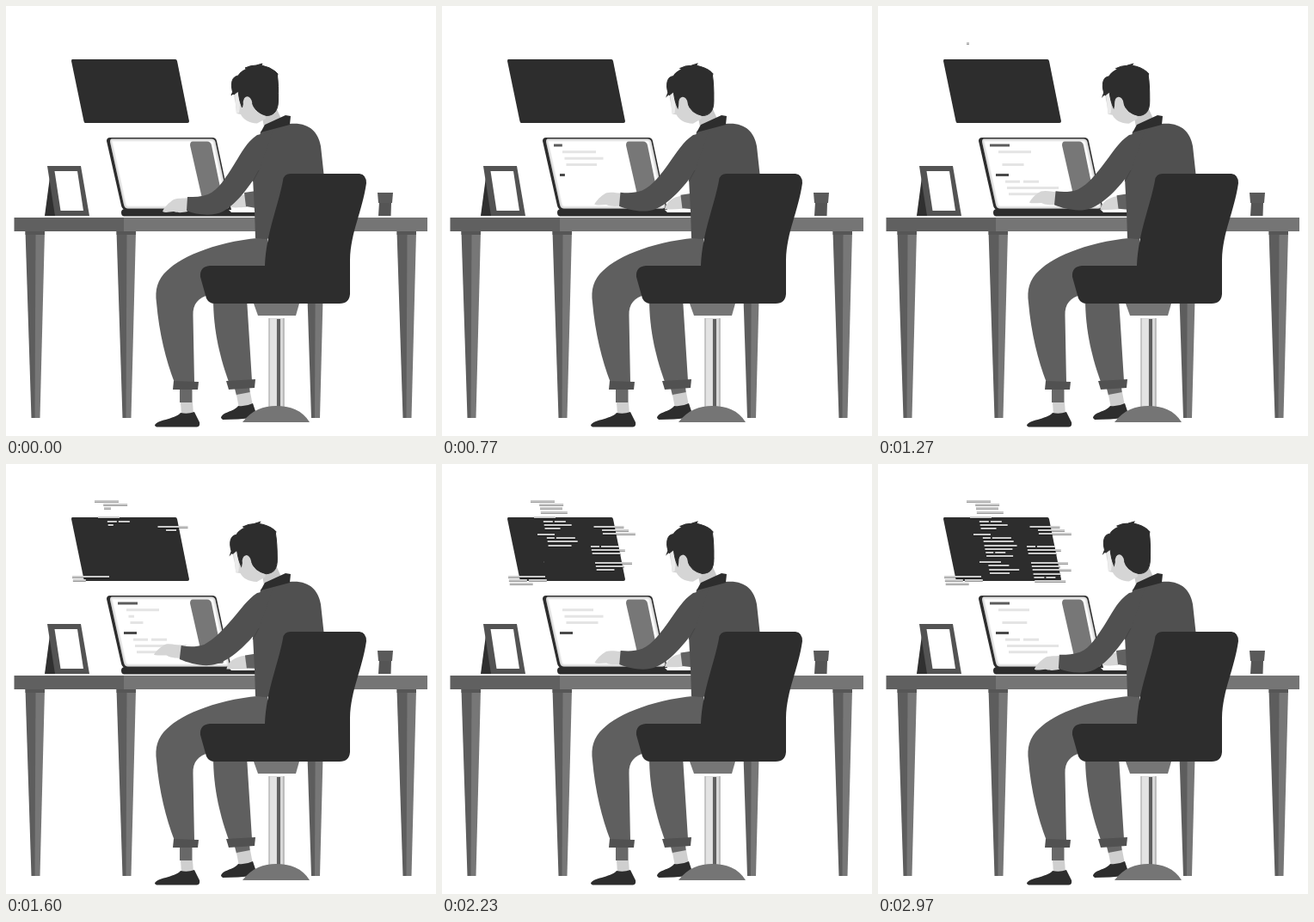
An HTML page with a canvas that plays this animation: 500 px wide and 500 px high, repeating every 3.01 s.

```html
<!DOCTYPE html>
<html lang="en">
<head>
<meta charset="utf-8">
<title>Typing at a desk</title>
<style>
html, body { margin: 0; width: 100%; height: 100%; overflow: hidden; background: #fff; }
canvas { display: block; width: 500px; height: 500px; }
</style>
</head>
<body>
<canvas id="stage" width="500" height="500"></canvas>
<script>
const LOOP = 3010;
const ctx = document.getElementById('stage').getContext('2d');
const DARK = '#2d2d2d', SHIRT = '#505050', PANTS = '#5f5f5f', SKIN = '#d5d5d5';

const fill = (color, d) => { ctx.fillStyle = color; ctx.fill(new Path2D(d)); };
const stroke = (color, width, d) => {
  ctx.strokeStyle = color;
  ctx.lineWidth = width;
  ctx.stroke(new Path2D(d));
};
const bar = (color, x, y, w, h) => { ctx.fillStyle = color; ctx.fillRect(x, y, w, h); };
const clamp = v => Math.max(0, Math.min(1, v));

// Mixes two paths that share the same commands.
function mix(a, b, p) {
  const to = b.match(/[\d.]+/g);
  let i = 0;
  return a.replace(/[\d.]+/g, n => (+n + (to[i++] - n) * p).toFixed(2));
}

// Value at time t in a flat list of time, value pairs.
function track(keys, t) {
  for (let i = 2; i < keys.length; i += 2) {
    if (t < keys[i]) {
      const k = (t - keys[i - 2]) / (keys[i] - keys[i - 2]);
      return keys[i - 1] + (keys[i + 1] - keys[i - 1]) * k;
    }
  }
  return keys[keys.length - 1];
}

// A line drawn up to `len`, with an optional break.
function codeLine(color, x, y, len, h, gap, space) {
  if (len <= 0) return;
  bar(color, x, y, gap ? Math.min(len, gap) : len, h);
  if (gap && len > gap + space) bar(color, x + gap + space, y, len - gap - space, h);
}

const boardGroups = [
  { at: 1255, step: 150, x: 103, y: 42, indent: 9.3, w: [28, 28, 26, 31], gaps: {} },
  { at: 1290, step: 142, x: 107, y: 61.3, indent: 10, w: [25, 26, 32, 18], gaps: { 1: 11 } },
  { at: 1860, step: 100, x: 111, y: 81, indent: 10, w: [20, 33, 35, 38, 32, 23, 31], gaps: { 1: 9, 5: 9 } },
  { at: 2230, step: 150, x: 118, y: 113.2, indent: 9.5, w: [25, 24, 35, 23], gaps: {} },
  { at: 1400, step: 145, x: 176.5, y: 71.8, indent: 8.7, w: [35, 31, 38], gaps: {} },
  { at: 1700, step: 148, x: 173, y: 94.9, indent: 0, w: [33, 39, 33], gaps: { 0: 10 } },
  { at: 1980, step: 102, x: 178, y: 114, indent: 0, w: [43, 33, 45, 32, 25, 36], gaps: { 4: 12 } },
  { at: 1400, step: 150, x: 77, y: 130, indent: 0, w: [43, 44, 27], gaps: { 1: 21 } }
];

const HEADING = '#5c5c5c', TEXT = '#e4e4e4';
const screenLines = [
  { c: HEADING, x: 130, y: 160.5, k: [0, 0, 130, 0, 330, 23, 700, 23, 824, 0, 1000, 0, 1180, 23, 1827, 23, 1950, 0, 2780, 0, 2940, 23] },
  { c: TEXT, x: 140, y: 168.2, k: [0, 0, 200, 0, 385, 39, 820, 39, 960, 0, 1080, 0, 1250, 38, 1700, 38, 1850, 0, 2000, 0, 2180, 36] },
  { c: TEXT, x: 142.5, y: 175.7, k: [0, 0, 380, 0, 600, 45, 900, 45, 1100, 0, 1550, 0, 1900, 45, 2650, 45, 2850, 0] },
  { c: TEXT, x: 144.5, y: 183, k: [0, 0, 560, 0, 780, 37, 1200, 37, 1420, 0, 1500, 0, 1750, 37, 2920, 37, 3150, 0] },
  { c: '#4a4a4a', x: 137, y: 195, k: [0, 0, 720, 0, 850, 15, 2250, 15, 2330, 0, 2480, 0, 2600, 15] },
  { c: TEXT, x: 148, y: 202.7, gap: 17, k: [0, 0, 820, 0, 1000, 39, 1860, 39, 2000, 0, 2540, 0, 2750, 39] },
  { c: TEXT, x: 150, y: 210, k: [0, 0, 950, 0, 1120, 60, 1860, 60, 2010, 0, 2540, 0, 2740, 60] },
  { c: TEXT, x: 152, y: 217.2, k: [0, 0, 1080, 0, 1260, 45, 1830, 45, 1970, 0, 2650, 0, 2850, 45] }
];

// Each pair: hand resting, hand reaching.
const poses = {
  sleeve: [
    'M310 146 L292 150 C280 158 274 170 266 183 C256 199 247 214 235 219 C227 222 219 222 211 222 L210 238 C222 243 240 245 252 239 C266 232 282 212 294 192 Z',
    'M310 146 L292 150 C280 158 274 168 263 180 C253 191 243 202 230 209 C221 212 212 212 203 210 L201 226 C213 231 230 236 244 232 C260 228 280 210 294 192 Z'],
  hand: [
    'M212 223 C206 224 200 223 195 225 C189 229 184 234 182 239 C186 241 190 239 195 239 C201 241 206 240 211 239 Z',
    'M204 211 C198 209 191 207 185 208 C178 211 174 216 171 220 C174 221 180 221 186 221 C190 224 196 224 202 225 Z'],
  backHand: [
    'M261 234 C264 227 270 220 278 219 L280 234 C273 234 267 235 261 234 Z',
    'M256 239 C257 230 266 224 279 223 L281 238 C273 239 265 239 256 239 Z'],
  backSleeve: [
    'M277 217 L291 215 L291 235 L279 233 Z',
    'M278 223 L291 221 L291 238 L280 238 Z']
};

function board(t) {
  fill(DARK, 'M77 62 L197 62 Q198.500 62 199 64 L213 134 Q213 136 211 136 L92 136 Q91 136 90.500 134 L76 64 Q76 62 77 62 Z');
  for (const g of boardGroups) {
    g.w.forEach((w, i) => {
      const len = w * clamp((t - g.at) / g.step - i);
      const x = g.x + (i ? g.indent : 0) + i * 0.85;
      const y = Math.round(g.y + i * 4.2);
      const space = g.gaps[i] ? 2 : 0;
      codeLine('rgba(0,0,0,.4)', x, y + 2, len, 1, g.gaps[i], space);
      codeLine('#cacaca', x, y, len, 2, g.gaps[i], space);
    });
  }
}

function leg(x) {
  fill('#5d5d5d', `M${x} 262 h13 l-1 217 h-5 Z`);
  fill('#777', `M${x + 12} 262 h10.500 l-5.500 217 h-6 Z`);
  bar('#565656', x, 262, 22.5, 4);
}

function desk() {
  [22.5, 128.5, 348, 454.5].forEach(leg);
  bar('#606060', 9.5, 246, 128, 16);
  bar('#757575', 137, 246, 353, 16);

  fill('#303030', 'M51 199 L58 244 H45 Z');
  fill('#535353', 'M48 186 H87 L97 244 H57 Z');
  fill('#fff', 'M56.500 192 H83 L90 238 H63.500 Z');

  fill('#555', 'M434 228 H448 L447.500 244 H433 Z');
  fill('#5a5a5a', 'M432 217 H450 L449 229 H433 Z');
}

function laptop(t) {
  fill(DARK, 'M121 153 H240 Q244 153 245 157 L262 237 H140 Q135 237 134 232 L117 157 Q117 153 121 153 Z');
  const screen = 'M123 154.500 H239 Q242.500 154.500 243.500 158 L259.500 232 Q259.500 235.500 256 235.500 H142 Q138 235.500 137 231 L121 158 Q121 154.500 123 154.500 Z';
  fill('#fff', screen);
  ctx.save();
  ctx.clip(new Path2D(screen));
  for (let i = 1; i < 4; i++) stroke('rgba(120,120,120,.12)', i * 2, screen);
  ctx.restore();
  fill('#777', 'M217 157.500 H234 Q238 157.500 239 162 L253 230 Q253 232 250 232 H234 Q230 232 229 228 L214 162 Q214 157.500 217 157.500 Z');
  for (const l of screenLines) {
    codeLine(l.c, l.x, l.y, track(l.k, t), 3, l.gap, 4);
  }
  fill(DARK, 'M137 236 H258 L262 240 H290 V244.500 H137 Q134 244 134 240 Q134 237 137 236 Z');
}

function legs() {
  bar('#686868', 202, 446, 14.5, 15);
  fill('#cfcfcf', 'M203 461 H217 L218 475 H204 Z');
  fill('#686868', 'M266 445 L283 443 L284 451 L268 453 Z');
  fill('#cfcfcf', 'M268 452 L284 449 L287 465 L271 468 Z');
  fill(DARK, 'M173 488 C174 481 196 481 203 473 Q211 475 219 472 L225 484 Q226 489 222 489.500 H175 Z');
  fill(DARK, 'M250 479 C251 472 265 472 270 465 Q279 466 287 462 L291 474 L287 479 Q270 481 252 481 Z');
  fill(PANTS, 'M241 340 C241 380 250 412 259 437 L286 436 L280 340 Z');
  fill(PANTS, 'M304 269 C250 272 205 290 187 308 C176 318 173 330 175 345 C178 380 186 412 196 438 L219 438 L217.500 360 C217 346 224 339 236 336 L304 330 Z');
  fill('#515151', 'M195 436 L224 437 L223 446 L194 446 Z');
  fill('#515151', 'M256 436 L290 434 L289 444 L259 446 Z');
}

function chair() {
  fill('#767676', 'M288 346 H341 L337 360 H293 Z');
  bar('#d8d8d8', 305.5, 363, 18, 105);
  bar('#aaa', 305.5, 363, 1, 105);
  bar('#e3e3e3', 307, 364, 7, 104);
  bar('#606060', 315, 364, 4, 104);
  bar('#999', 322.5, 363, 1, 105);
  fill('#757575', 'M275 484 C285 470 300 465 314 465 C330 465 345 470 353 484 Z');
  fill(DARK, 'M322 203 Q323 195 331 195 H411 Q419 196 419 206 C414 240 401 262 400 295 V335 Q399 346 388 346 H243 Q236 346 233 340 L226 315 Q225 303 237 302 H301 C303 262 316 235 322 203 Z');
}

function head(p) {
  fill('#c9c9c9', 'M297 124 L315 120 L320 131 L300 141 Z');
  ctx.save();
  ctx.translate(308 - p * 0.5, 131);
  ctx.rotate(-p * 0.035);
  ctx.translate(-308, -131);
  fill(SKIN, 'M266 97 C264 106 267 111 267 115 L268 125 L273 126 C276 132 282 136 292 136.500 L302 131 L300 98 Z');
  fill('#ebebeb', 'M266 99 L270 101 Q273 114 271 124 L268 125 L267 113 Z');
  const hair = 'M265 103 L264 102 L262 104 L263.500 100 C261 90 262.500 82 270 81 C272 77 276 75 280 73 L278 72 Q284 69 291 69 L298 67 L297 69 Q307 71 313 76 L316 79 L315.500 81 Q317 92 316.500 110 C316.500 121 312 127.500 303 127.500 C293 125 288 119 286 112 L277 106 L274.500 118 Q271 110 270 99 Z';
  fill(DARK, hair);
  stroke(DARK, 1, hair);
  ctx.fillStyle = SKIN;
  ctx.beginPath();
  ctx.ellipse(281, 113, 5.2, 7.8, -0.1, 0, Math.PI * 2);
  ctx.fill();
  ctx.restore();
}

function draw(t) {
  // Three reaches per loop.
  const p = (1 - Math.cos(t / LOOP * 6 * Math.PI)) / 2;
  const limb = (color, name) => fill(color, mix(...poses[name], p));
  bar('#fff', 0, 0, 500, 500);
  board(t);
  desk();
  laptop(t);
  limb(SKIN, 'backHand');
  limb('#626262', 'backSleeve');
  legs();
  fill(SHIRT, 'M296 146 L330 137 C352 135 363 146 366 163 L370 200 V260 L302 271 L290 270 L289 238 L287 200 Z');
  head(p);
  fill(DARK, 'M296 147 L301 138 L325 127 L331 128 L330 138 Z');
  limb(SKIN, 'hand');
  limb(SHIRT, 'sleeve');
  stroke('#454545', 1, 'M294 191 L287 204');
  chair();
}

const start = performance.now();
function tick() {
  draw((performance.now() - start) % LOOP);
  requestAnimationFrame(tick);
}
tick();
</script>
</body>
</html>
```
